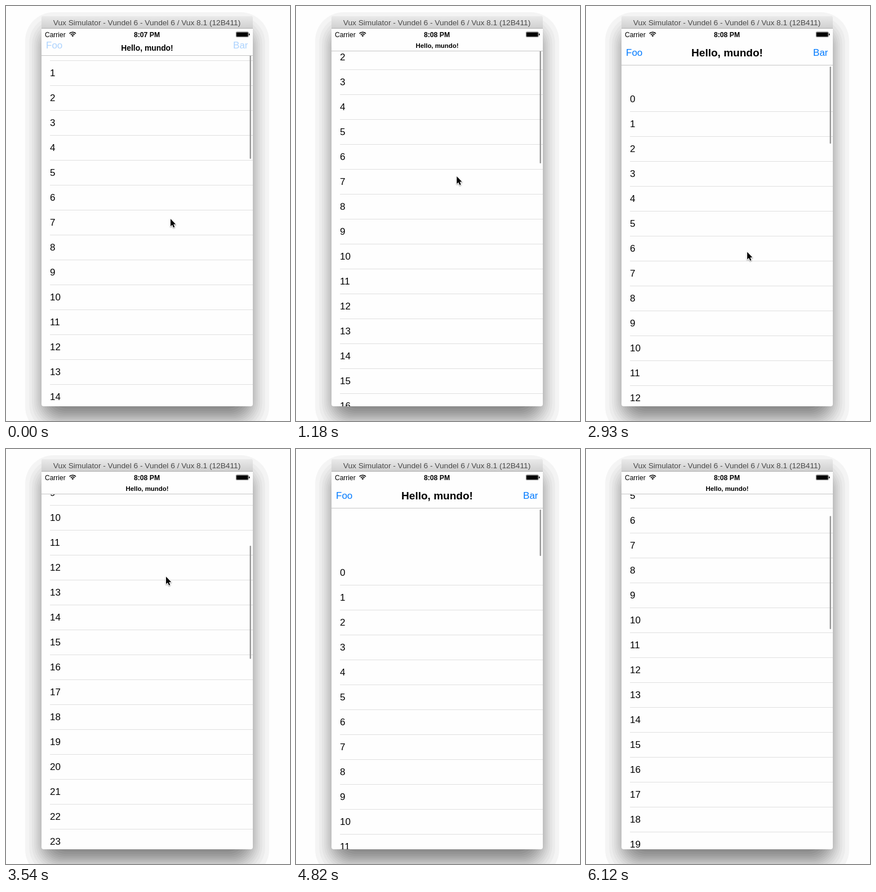
These frames come from a looping animation (504 by 733 pixels, 6220 ms). An HTML page with a canvas:

```html
<!DOCTYPE html>
<html lang="en">
<head>
<meta charset="utf-8">
<title>Collapsing navigation bar</title>
<style>
  html, body { margin: 0; width: 504px; height: 733px; overflow: hidden; background: #fefefe; }
  canvas { display: block; }
</style>
</head>
<body>
<canvas id="stage" width="504" height="733"></canvas>
<script>
const ctx = document.getElementById('stage').getContext('2d');
const LOOP = 6220, EXIT = 5860;
const FONT = '"Liberation Sans", Arial, sans-serif';
const LEFT = 63, RIGHT = 438, TOP = 17, BOTTOM = 707, WIDTH = RIGHT - LEFT;
const ROW = 44, NAV = 104, MAX_FOLD = 25;

const clamp = (v, lo, hi) => Math.min(hi, Math.max(lo, v));
const mix = (a, b, u) => a + (b - a) * u;
const swing = u => (1 - Math.cos(Math.PI * u)) / 2;
const flick = u => 1 - (1 - u) ** 3;

// Turning points of the list: dragged back and forth, or flicked
const scroll = [
  { t: 0, y: 51 },
  { t: 950, y: 140 },
  { t: 1980, y: -3 },
  { t: 2430, y: 76 },
  { t: 3000, y: -43 },
  { t: 4130, y: 525, ease: flick },
  { t: 4700, y: -95 },
  { t: 5250, y: -78 },
  { t: 6120, y: 263, ease: flick }
];

// Turning points of the pointer
const pointer = [
  { t: 0, x: 292, y: 376 },
  { t: 950, x: 285, y: 288 },
  { t: 1980, x: 288, y: 398 },
  { t: 2430, x: 288, y: 319 },
  { t: 3000, x: 286, y: 439 },
  { t: 3500, x: 284, y: 225, ease: flick },
  { t: 4130, x: 284, y: 286 },
  { t: 4700, x: 345, y: 740 },
  { t: 5250, x: 375, y: 740 },
  { t: 5520, x: 362, y: 609 },
  { t: EXIT, x: 455, y: 740 }
];

function at(path, prop, t) {
  const i = path.findIndex(p => p.t > t);
  if (i < 0) return path[path.length - 1][prop];
  const a = path[i - 1], b = path[i], ease = b.ease || swing;
  return mix(a[prop], b[prop], ease((t - a.t) / (b.t - a.t)));
}

function rect(x, y, w, h, color) {
  ctx.fillStyle = color;
  ctx.fillRect(x, y, w, h);
}

function pill(x, y, w, h, r, color) {
  ctx.fillStyle = color;
  ctx.beginPath();
  ctx.roundRect(x, y, w, h, r);
  ctx.fill();
}

function text(str, x, y, size, color = '#000', align = 'left', weight = '') {
  ctx.font = `${weight} ${size}px ${FONT}`;
  ctx.textAlign = align;
  ctx.fillStyle = color;
  ctx.fillText(str, x, y);
}

// Blurred shadow in flat bands: d is how far each gray reaches outward
function drawShadow() {
  for (let gray = 244; gray > 122; gray -= 8) {
    const p = (255 - gray) / 255 / 0.55;
    const d = -11.75 * Math.log(p / (1 - p));
    pill(LEFT - d, 40 - d, WIDTH + 2 * d, 689 + 2 * d, 36 + d / 2, `rgb(${gray},${gray},${gray})`);
  }
}

function drawTitleBar() {
  const g = ctx.createLinearGradient(0, TOP, 0, 39);
  g.addColorStop(0, '#ebebeb');
  g.addColorStop(1, '#d0d0d0');
  rect(LEFT, TOP, WIDTH, 23, g);
  rect(LEFT, TOP, WIDTH, 1, '#f3f3f3');
  rect(LEFT, 39, WIDTH, 1, '#b0b0b0');
  text('Vux Simulator - Vundel 6 - Vundel 6 / Vux 8.1 (12B411)', 250, 34, 13.7, '#4a4a4a', 'center');
}

function drawStatus(t) {
  text('Carrier', 69, 55, 12);
  text(t < 960 ? '8:07 PM' : '8:08 PM', 250, 55, 12.2, '#000', 'center', 'bold');

  ctx.strokeStyle = '#000';
  ctx.lineWidth = 1.6;
  for (const r of [4.6, 7.8]) {
    ctx.beginPath();
    ctx.arc(118.3, 54, r, -Math.PI * 0.76, -Math.PI * 0.24);
    ctx.stroke();
  }
  ctx.fillStyle = '#000';
  ctx.beginPath();
  ctx.moveTo(118.3, 54.5);
  ctx.arc(118.3, 54, 2.6, -Math.PI * 0.78, -Math.PI * 0.22);
  ctx.fill();

  ctx.lineWidth = 0.5;
  ctx.beginPath();
  ctx.roundRect(408.25, 45.75, 22, 9, 1.5);
  ctx.stroke();
  pill(409, 46.5, 20.5, 7.5, 1, '#000');
  pill(431, 48.5, 1.5, 3.5, 0.7, '#000');
}

function drawRows(offset, navBottom) {
  const first = 126 - Math.round(offset);
  const top = Math.max(0, Math.floor((navBottom - first) / ROW) - 1);
  for (let n = top; first + n * ROW < BOTTOM + 22; n++) {
    const y = first + n * ROW;
    text(n, 78, y + 5, 17);
    rect(78, y + 21, RIGHT - 78, 1, '#e0e0e0');
  }
}

function drawScrollbar(offset, fold, navBottom) {
  let top = 107, end = 282 + offset;
  if (offset > 0) {
    end = 242.4 + offset * 0.2888 + 1.6 * (MAX_FOLD - fold);
    top = Math.max(navBottom, fold < MAX_FOLD ? navBottom + 3 - offset : end - 200);
  }
  pill(432.5, top, 2.5, end - top, 1.25, '#999');
}

function drawNav(fold, navBottom) {
  const folded = fold / MAX_FOLD, scale = 1 - 0.4 * folded;
  rect(LEFT, 40, WIDTH, navBottom - 40, '#fefefe');
  rect(LEFT, navBottom, WIDTH, 1, '#c6c6c6');
  ctx.globalAlpha = 1 - folded;
  const y = 88 - 0.75 * fold;
  text('Foo', 71, y, 17, '#007aff');
  text('Bar', 429.5, y, 17, '#007aff', 'right');
  ctx.globalAlpha = 1;
  text('Hello, mundo!', 250.5, 82.3 - fold / 2 + 6.7 * scale, 19.05 * scale, '#000', 'center', 'bold');
}

function drawPointer(x, y) {
  ctx.save();
  ctx.translate(x, y);
  ctx.beginPath();
  [[0, 0], [0, 13], [3, 10.4], [5.2, 15.2], [7.3, 14.3], [5.2, 9.6], [9.2, 9.4]]
    .forEach(p => ctx.lineTo(...p));
  ctx.closePath();
  ctx.lineJoin = 'round';
  ctx.lineWidth = 2;
  ctx.strokeStyle = '#fff';
  ctx.shadowColor = 'rgba(0,0,0,.4)';
  ctx.shadowBlur = 2;
  ctx.shadowOffsetY = 1;
  ctx.stroke();
  ctx.shadowColor = 'transparent';
  ctx.fillStyle = '#000';
  ctx.fill();
  ctx.restore();
}

function draw(t) {
  // The bar folds by a third of the scrolled distance
  const offset = at(scroll, 'y', t);
  const fold = clamp(offset / 3, 0, MAX_FOLD);
  const navBottom = Math.round(NAV - fold);

  rect(0, 0, 504, 733, '#fefefe');
  drawShadow();

  ctx.save();
  ctx.beginPath();
  ctx.roundRect(LEFT, TOP, WIDTH, BOTTOM - TOP, 4);
  ctx.clip();
  rect(LEFT, TOP, WIDTH, BOTTOM - TOP, '#fefefe');
  drawRows(offset, navBottom);
  drawScrollbar(offset, fold, navBottom);
  drawNav(fold, navBottom);
  drawStatus(t);
  drawTitleBar();
  ctx.restore();

  if (t < EXIT) drawPointer(at(pointer, 'x', t), at(pointer, 'y', t));
}

let start;
function tick(now) {
  start ??= now;
  draw((now - start) % LOOP);
  requestAnimationFrame(tick);
}
draw(0);
requestAnimationFrame(tick);
</script>
</body>
</html>
```
